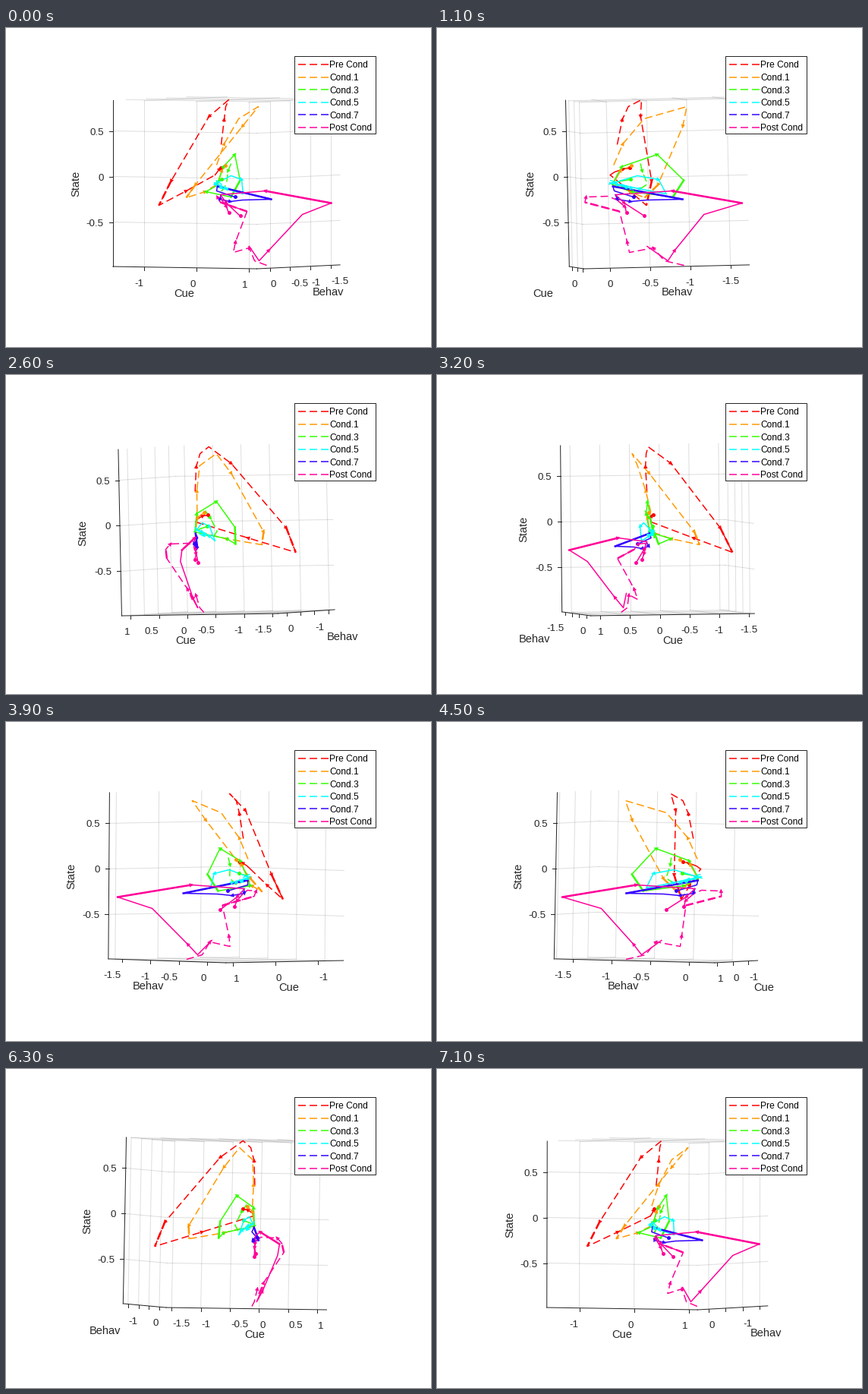
Write a matplotlib script that moves like this. It is 560 by 420 pixels and loops after 7.2 s.

```python
import colorsys
import math

import numpy as np
import matplotlib
import matplotlib.pyplot as plt
from matplotlib.animation import FuncAnimation
from matplotlib.patches import Polygon, Rectangle

W, H, DPI = 560, 420, 100
FRAMES, INTERVAL = 72, 100
CX, CY = 290, 203          # centre of rotation on the stage
HALF = 109.5               # half the edge of the plot cube
START, TILT = math.radians(30), math.radians(1.55)
SIDE_VIEW = math.radians(95)
PX = 72 / DPI              # one pixel in points
INK = "#262626"
THIN, HEAVY = 1.5, 2.5     # line widths in pixels

matplotlib.rcParams["font.family"] = "Liberation Sans"

# lower limit and pixels per unit of each axis
CUE, BEHAV, STATE = (-1.595, 79.5), (-1.736, 106.2), (-0.988, 120.0)

NAMES = ["Pre Cond", "Cond.1", "Cond.3", "Cond.5", "Cond.7", "Post Cond"]
COLORS = [colorsys.hsv_to_rgb(h / 10, 1, 1) for h in (0, 1, 3, 5, 7, 9)]

# Vertices: x at the start, x after a 95 degree turn, y, marks
# (a = arrow, d = end dot, t = heavy segment leading here)
PRE = [(283, 231, 153, ""), (287, 236, 120, "a"), (289, 244, 103, ""),
       (293, 262, 94, ""), (267, 281, 116, "a"), (217, 338, 201, "a"),
       (201, 342, 233, "t"), (237, 287, 214, "a"), (275, 226, 193, "")]
PRE_END = [(275, 226, 193, ""), (278, 231, 189, ""), (281, 243, 185, "a"),
           (282, 252, 184, "d")]
ONE = [(277, 230, 180, ""), (287, 237, 152, "a"), (306, 256, 119, ""),
       (332, 304, 103, ""), (311, 314, 129, "a"), (249, 323, 206, "a"),
       (237, 311, 223, "t"), (262, 268, 215, "a"), (278, 228, 205, "")]
ONE_END = [(278, 228, 205, ""), (284, 236, 187, "a"), (288, 250, 181, "d")]
THREE_DASH = [(296, 258, 178, ""), (292, 264, 188, "a"), (290, 274, 205, ""),
              (284, 262, 214, ""), (279, 240, 208, "")]
THREE = [(278, 227, 205, ""), (286, 236, 182, "a"), (301, 281, 166, "a"),
         (308, 318, 200, ""), (296, 310, 222, "t"), (263, 270, 215, "a"),
         (279, 226, 206, ""), (277, 235, 202, ""), (283, 252, 199, "d")]
FIVE_DASH = [(276, 225, 200, ""), (283, 238, 205, ""), (288, 250, 211, "a"),
             (280, 236, 209, "")]
FIVE = [(274, 225, 205, ""), (296, 253, 194, ""), (310, 276, 199, "a"),
        (312, 287, 218, ""), (290, 260, 211, "a"), (274, 226, 203, ""),
        (276, 238, 206, "a"), (282, 246, 209, "d")]
SEVEN = [(283, 228, 219, ""), (281, 233, 225, "a"), (295, 243, 228, "a"),
         (311, 256, 226, ""), (349, 284, 225, ""), (278, 228, 208, "t"),
         (277, 231, 214, ""), (301, 243, 222, "d")]
POST_DASH = [(343, 291, 312, ""), (327, 272, 306, ""), (320, 260, 289, "a"),
             (299, 238, 295, ""), (302, 232, 281, "a"), (317, 208, 241, ""),
             (282, 180, 229, "t"), (278, 185, 222, "a"), (281, 218, 221, ""),
             (284, 230, 226, "")]
POST_END = [(284, 230, 226, ""), (290, 238, 235, "a"), (293, 238, 243, "d")]
POST = [(320, 250, 287, ""), (333, 273, 306, ""), (346, 274, 292, "a"),
        (390, 286, 245, ""), (428, 317, 230, ""), (341, 274, 214, "at"),
        (282, 229, 219, ""), (290, 237, 230, "a"), (308, 255, 247, "d")]

# condition, dashed?, vertices
PATHS = [(0, True, PRE), (0, False, PRE_END), (1, True, ONE),
         (1, False, ONE_END), (2, True, THREE_DASH), (2, False, THREE),
         (3, True, FIVE_DASH), (3, False, FIVE), (4, False, SEVEN),
         (5, True, POST_DASH), (5, False, POST_END), (5, False, POST)]

fig = plt.figure(figsize=(W / DPI, H / DPI), dpi=DPI, facecolor="white")
ax = fig.add_axes([0, 0, 1, 1])


def line(pts, color=INK, width=1.0, dashed=False, **kw):
    xs, ys = zip(*pts)
    style = (0, (10 / width, 5 / width)) if dashed else "-"
    ax.plot(xs, ys, color=color, lw=width * PX, ls=style,
            solid_joinstyle="round", dash_capstyle="butt", **kw)


def text(x, y, s, size, color=INK, ha="center", rotation=0, zorder=5):
    """Level text stands on its baseline, turned text is centred."""
    ax.text(x, y, s, fontsize=size * PX, color=color, ha=ha,
            va="center" if rotation else "baseline",
            rotation=rotation, zorder=zorder)


def project(p, turn):
    """Cube point to stage x, y and depth, turning about the screen vertical."""
    x, y, z = p
    r = x * math.cos(START) - y * math.sin(START)
    h = x * math.sin(START) + y * math.cos(START)
    up = z * math.cos(TILT) - h * math.sin(TILT)
    d = h * math.cos(TILT) + z * math.sin(TILT)
    c, s = math.cos(turn), math.sin(turn)
    return CX + r * c - d * s, CY - up, r * s + d * c


def ticks(axis, step):
    """Index, value and cube position of each tick."""
    low, scale = axis
    high = low + 2 * HALF / scale
    first, last = math.ceil(low / step), math.floor(high / step)
    return [(i, i * step, -HALF + (i * step - low) * scale)
            for i in range(first, last + 1)]


def label_shift(name, angle):
    """How far an axis title sits outward from the middle of its axis."""
    c, s = abs(math.cos(angle)), abs(math.sin(angle))
    if name == "Behav":
        return 14 + 44 * c ** 4
    if math.degrees(angle) % 180 > 121:
        return 78 * min(1, (s / 0.7) ** 2)
    return 45 * s ** 6


def draw_grid(turn, marks):
    """Draw the grid on the three rear faces; return where they lie."""
    far = [math.copysign(HALF, project(axis, turn)[2]) for axis in np.eye(3)]
    for k in range(3):
        for _, _, v in marks[k]:
            for fixed in {0, 1, 2} - {k}:
                run = 3 - k - fixed
                ends = []
                for side in (-HALF, HALF):
                    p = [0, 0, 0]
                    p[k], p[fixed], p[run] = v, far[fixed], side
                    ends.append(project(p, turn)[:2])
                line(ends, alpha=0.15, zorder=1)
    return far


def draw_floor_axis(k, other, name, marks, turn, widest):
    def at(v):
        p = [0, 0, -HALF]
        p[k], p[1 - k] = v, other
        return project(p, turn)[:2]

    a, b = at(-HALF), at(HALF)
    line([a, b], zorder=2)
    mx, my = (a[0] + b[0]) / 2, (a[1] + b[1]) / 2
    side = -1 if mx < CX else 1
    gap = abs(at(marks[1][2])[0] - at(marks[0][2])[0])
    skip = max(1, math.ceil((widest + 2) / max(gap, 0.1)))
    if abs(b[0] - a[0]) > 0.98 * 2 * HALF:
        align, nudge = "center", 0
    else:
        align, nudge = ("right" if side < 0 else "left"), side
    for i, value, v in marks:
        x, y = at(v)
        line([(x, y), (x, y + 4)], zorder=2)
        if i % skip == 0:
            text(x + nudge, y + 25, f"{value:g}", 13.33, ha=align)
    shift = label_shift(name, START + turn)
    text(mx + side * shift, my + 38, name, 14.67)


def draw_state_axis(turn, marks):
    corners = [(x, y) for x in (-HALF, HALF) for y in (-HALF, HALF)]
    left = min(corners, key=lambda c: project((*c, 0), turn)[0])
    line([project((*left, z), turn)[:2] for z in (-HALF, HALF)], zorder=2)
    for _, value, v in marks:
        x, y, _ = project((*left, v), turn)
        line([(x - 5, y), (x, y)], zorder=2)
        text(x - 12, y + 5, f"{value:g}", 13.33, ha="right")
    x, y, _ = project((*left, 0), turn)
    text(x - 49, y, "State", 14.67, rotation=90)


def draw_axes(turn):
    wide = abs(math.cos(START + turn)) > 0.935
    cue, behav, state = marks = [ticks(CUE, 0.5 if wide else 1),
                                 ticks(BEHAV, 0.5), ticks(STATE, 0.5)]
    far = draw_grid(turn, marks)
    # seen from below the lowest edges are the rear ones, else the front ones
    sign = math.copysign(1, far[2])
    draw_floor_axis(0, sign * far[1], "Cue", cue, turn, 23 if wide else 12)
    draw_floor_axis(1, sign * far[0], "Behav", behav, turn, 23)
    draw_state_axis(turn, state)


def turned(path, turn):
    c, s = math.cos(turn), math.sin(turn)
    pts = []
    for x0, x95, y, _ in path:
        r = x0 - CX
        d = (r * math.cos(SIDE_VIEW) - (x95 - CX)) / math.sin(SIDE_VIEW)
        pts.append((CX + r * c - d * s, y))
    return pts


def arrow(tail, tip, color):
    t, p = np.array(tail), np.array(tip)
    d = (p - t) / max(np.hypot(*(p - t)), 0.1)
    n = 2.7 * np.array([-d[1], d[0]])
    ax.add_patch(Polygon([p + 3 * d, p - 2.5 * d + n, p - 2.5 * d - n],
                         fc=color, ec="none", zorder=4))


def draw_path(cond, dashed, path, turn):
    color = COLORS[cond]
    pts = turned(path, turn)
    line(pts, color, THIN, dashed, zorder=3)
    for i, (_, _, _, flags) in enumerate(path):
        if "t" in flags:
            line(pts[i - 1:i + 1], color, HEAVY, dashed, zorder=3)
        if "a" in flags:
            arrow(pts[i - 1], pts[i], color)
        if "d" in flags:
            ax.plot(*pts[i], "o", ms=5 * PX, color=color, mew=0, zorder=4)


def draw_legend():
    ax.add_patch(Rectangle((379.4, 37), 107, 102, fc="white", ec=INK,
                           lw=PX, zorder=8))
    for i, (name, color) in enumerate(zip(NAMES, COLORS)):
        y = 47.5 + 16.6 * i
        line([(384, y), (424, y)], color, THIN, True, zorder=9)
        text(426, y + 4.5, name, 12, "black", "left", zorder=9)


def draw(n):
    ax.clear()
    ax.set_xlim(-0.5, W - 0.5)
    ax.set_ylim(H - 0.5, -0.5)
    ax.axis("off")
    turn = 2 * math.pi * n / FRAMES
    draw_axes(turn)
    for cond, dashed, path in PATHS:
        draw_path(cond, dashed, path, turn)
    draw_legend()
    return []


anim = FuncAnimation(fig, draw, frames=FRAMES, interval=INTERVAL,
                     init_func=lambda: [], repeat=True, repeat_delay=0)
plt.show()
```
